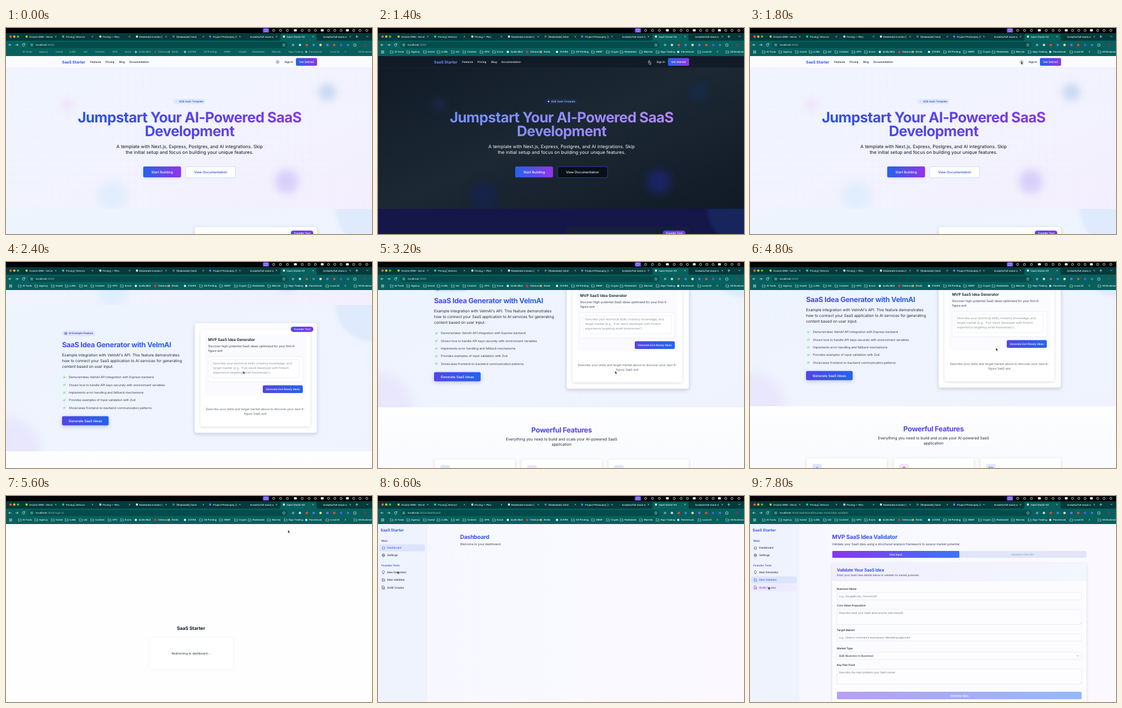
These frames come from a looping animation (640x360 px, 8 s). An HTML page:

```html
<!DOCTYPE html>
<html lang="en">
<head>
<meta charset="utf-8">
<title>SaaS Starter Kit</title>
<style>
html, body { margin: 0; width: 100%; height: 100%; overflow: hidden; background: #000; }
svg { display: block; width: 100%; height: 100%; font-family: Inter, Roboto, sans-serif; text-rendering: geometricPrecision; }
.tight { letter-spacing: -.025em; }
.soft { filter: blur(7px); }
.hazy { filter: blur(2.5px); }
.card { filter: drop-shadow(0 1px 2px #33415533); }
.lift { filter: drop-shadow(0 2px 3px #33415540); }
</style>
</head>
<body>
<svg id="stage" viewBox="0 0 640 360"></svg>
<script>
const LOOP = 8000;
const mid = 'text-anchor="middle" ', medium = 'font-weight="500" ', semi = 'font-weight="600" ', bold = 'font-weight="700" ';
const heading = bold + 'class="tight" ';
const ink = '#111827', slate = '#374151', muted = '#8b93a1';

// y is the middle of the capitals
const text = (x, y, size, str, fill = ink, opt = '') =>
  `<text x="${x}" y="${(y + size * .36).toFixed(2)}" font-size="${size}" fill="${fill}" ${opt}>${str}</text>`;
const lines = (x, y, gap, size, rows, fill, opt) => rows.map((row, i) => text(x, y + i * gap, size, row, fill, opt)).join('');
const rect = (x, y, w, h, r, fill, opt = '') =>
  `<rect x="${x}" y="${y}" width="${w}" height="${h}" rx="${r}" fill="${fill}" ${opt}/>`;
const dot = (x, y, r, fill, opt = '') => `<circle cx="${x}" cy="${y}" r="${r}" fill="${fill}" ${opt}/>`;
const line = (d, color, width = .7, opt = '') =>
  `<path d="${d}" fill="none" stroke="${color}" stroke-width="${width}" stroke-linecap="round" stroke-linejoin="round" ${opt}/>`;
const group = (id, body, y = 0) => `<g ${id ? `id="${id}"` : ''} ${y ? `transform="translate(0 ${y})"` : ''}>${body}</g>`;
const button = (x, y, w, h, label, size, fill, color = '#fff', opt = '') =>
  rect(x, y, w, h, 2.3, fill, opt) + text(x + w / 2, y + h / 2, size, label, color, mid + medium);
const gradient = (id, from, to, opt = '', via = '') =>
  `<linearGradient id="${id}" ${opt}><stop stop-color="${from}"/>${via && `<stop offset=".5" stop-color="${via}"/>`}` +
  `<stop offset="1" stop-color="${to}"/></linearGradient>`;

// Stepped timeline: [[time, declarations], ...]
let css = '', trackCount = 0;
function track(selector, steps) {
  const name = 'track' + trackCount++;
  css += `@keyframes ${name}{${steps.map(([t, rule]) => `${t / LOOP * 100}%{${rule}}`).join('')}}` +
    `${selector}{animation:${name} ${LOOP}ms step-end infinite}`;
}
const show = (selector, from, to = LOOP) => track(selector,
  [[0, 'visibility:hidden'], [from, 'visibility:visible'], ...(to < LOOP ? [[to, 'visibility:hidden']] : [])]);
const move = (selector, steps) => track(selector, steps.map(([t, x, y]) => [t, `transform:translate(${x}px,${y}px)`]));

const defs = `<defs>
  ${gradient('brand', '#2563eb', '#9333ea')}${gradient('indigo', '#4f46e5', '#2563eb')}
  ${gradient('violet', '#4f46e5', '#7c3aed')}${gradient('tab', '#8b35ea', '#3b76f2')}
  ${gradient('faded', '#b6a0ee', '#96b9fa')}${gradient('panel', '#f1eefe', '#f3f7ff')}
  ${gradient('title', 'var(--from)', 'var(--to)', 'gradientUnits="userSpaceOnUse" x1="98" x2="544"')}
  ${gradient('sky', 'var(--sky1)', 'var(--sky3)', 'x2="1" y2="1"', 'var(--sky2)')}
  ${gradient('band', 'var(--band)', 'var(--band2)', 'y2="1"')}
  ${gradient('mist', '#fefeff', '#eff4fb', 'x2="0" y2="1"')}
  ${gradient('board', '#f6f8ff', '#fbf9ff')}
  <clipPath id="section"><rect y="75" width="640" height="256"/></clipPath>
  <pattern id="grid" width="13.3" height="13.3" patternUnits="userSpaceOnUse" y="4">
    <path d="M0 0H13.3M0 0V13.3" stroke="#6366f1" stroke-width=".5" opacity=".08"/></pattern></defs>`;

function browser() {
  const tabs = [[36, 41, 'Drizzle ORM - Get st', '#b8d94b', 87], [100, 105, 'Pricing | Kelvorn', '#34c98e', 151],
    [165, 169, 'Pricing — Plim', '#d8eee8', 216], [229, 233, 'Realestate Investor |', '#e8eeee', 280],
    [293, 298, '[Realestate] Solid', '#547c80', 345], [357, 362, 'Project Philosophy | I', '#7b6cf0', 409],
    [0, 427, 'korbaltz/full-stack-s', '', 473], [486, 491, 'SaaS Starter Kit', '#dbe9ea', 537],
    [0, 555, 'korbaltz/full-stack-s', '', 602]];
  const cross = x => line(`M${x - 1} 14l2 2m0-2l-2 2`, '#d7e7e5', .5);
  const menu = [468, 480, 492, 506, 518, 530, 541, 553, 564, 575, 586, 597, 608, 619, 631];
  const marks = [[24, 'AI Tools'], [53, 'Agency'], [82, 'Invest'], [106, 'LLMs'], [131, 'IaC'], [151, 'Content'],
    [181, 'OPS'], [203, 'Ecom'], [227, 'Quillo Mail', '#e9efee'], [261, 'Vidmuro', '#f33'], [285, 'Brellu', '#d6a75c'],
    [313, 'ZUVRA', '#e9efee'], [341, '3D Printing'], [376, 'SMSF'], [402, 'Crypto'], [426, 'Realestate'],
    [460, 'Murmlo'], [489, 'Algo Trading'], [525, 'Parcelnook', '#d9e8f5'], [562, 'Local AI'], [611, 'All Bookmarks']];
  const folder = x => line(`M${x - 2.2} 39.8h1.6l.7.7h2.3v3.3h-4.6z`, '#d6e8e5', .6, 'class="folder"');
  const tools = ['#55a7a8', '#bfd8df', '#e34b45', '#3a86d4', '#e7d9b4', '#7e6be0', '#e24a3b', '#3c63e6', '#4a78b8'];
  const url = (id, path) => text(52, 29.7, 4.6, `localhost<tspan fill="#a4c3c1">:3000${path}</tspan>`, '#fff', `id="${id}"`);
  return rect(0, 0, 640, 9.5, 0, '#020304') + rect(449, .5, 11, 7.5, 1.5, '#6c4ce0') +
    rect(452, 2.4, 5, 3.3, .5, 'none', 'stroke="#fff" stroke-width=".6"') +
    menu.map((x, i) => i % 4 == 3 ? rect(x - 2.5, 2, 5, 4, .8, '#e8e8e8')
      : dot(x, 4.2, 1.9, 'none', 'stroke="#e5e5e5" stroke-width=".8"')).join('') +
    rect(0, 9, 640, 14, 0, '#033a3c') + rect(0, 22, 640, 27, 0, '#07605d') +
    `<path d="M477 22q3 0 3-3v-6q0-2.5 2.5-2.5h58q2.5 0 2.5 2.5v6q0 3 3 3z" fill="#07605d"/>` +
    ['#ff5f57', '#febc2e', '#28c840'].map((c, i) => dot(8 + i * 6.5, 15, 2.1, c)).join('') +
    tabs.map(([icon, x, name, color, close]) => (icon ? dot(icon, 15, 1.9, color) : '') +
      text(x, 15, 4.2, name, '#eef6f5', medium) + cross(close)).join('') +
    line('M611.5 15h4m-2-2v4M630.5 14l1.5 1.5 1.5-1.5', '#e4f0ee') +
    line('M9 29.5H5m1.7-1.8L5 29.5l1.7 1.8M17 29.5h4m-1.7-1.8l1.7 1.8-1.7 1.8', '#e4f0ee') +
    line('M32.7 28.3a2.2 2.2 0 1 0 .3 2M33 27v1.7h-1.7', '#e4f0ee') +
    rect(39, 24.3, 453, 10.7, 5.3, '#044c4c') + dot(45, 29.6, 3.6, '#0c6662') +
    line('M43.5 28.6h3m-3 2h3', '#e4f0ee', .6) +
    url('url-home', '') + url('url-sign', '/sign-in') + url('url-dash', '/dashboard') +
    url('url-gen', '/dashboard/founder-tools/idea-generator') + url('url-val', '/dashboard/founder-tools/idea-validator') +
    line('M486 27.2l.8 1.6 1.8.2-1.3 1.2.3 1.8-1.6-.9-1.6.9.3-1.8-1.3-1.2 1.8-.2z', '#d9e9e7', .5) +
    tools.map((c, i) => dot(502 + i * 12, 29.6, 2.2, c)).join('') +
    rect(608, 27.8, 4, 4, .8, 'none', 'stroke="#e4f0ee" stroke-width=".7"') + dot(628, 29.6, 3, '#3b4f55') +
    [0, 1, 2].map(i => [0, 1, 2].map(j => rect(5.7 + i * 1.8, 39.5 + j * 1.8, 1.2, 1.2, 0, '#e4f0ee', 'class="folder"')).join('')).join('') +
    group('marks', marks.map(([x, name, color]) => (color ? dot(x, 41.8, 2, color) : folder(x)) +
      text(x + 5, 41.8, 4.2, name, '#f3f9f8', medium)).join('') + text(592, 41.5, 5, '»', '#e4f0ee'));
}

function hero() {
  const blob = (x, y, r, name) => dot(x, y, r, `var(--${name})`, 'class="soft"');
  const nav = [[147, 'Features'], [174, 'Pricing'], [198, 'Blog'], [216, 'Documentation'], [487, 'Sign In']];
  return rect(0, 49, 640, 267.5, 0, 'url(#sky)') + rect(0, 70, 640, 246, 0, 'url(#grid)', 'style="opacity:var(--grid)"') +
    blob(562, 112, 15, 'blob1') + blob(107, 134, 11, 'blob2') + blob(491, 268, 21, 'blob3') + blob(186, 294, 25, 'blob4') +
    rect(0, 48, 640, 21.5, 0, 'var(--nav)') + rect(0, 69.5, 640, .5, 0, 'var(--rule)') +
    text(98, 59.3, 6.7, 'SaaS Starter', 'url(#title)', bold) +
    nav.map(([x, name]) => text(x, 59.2, 4.65, name, 'var(--ink)', medium)).join('') +
    group('sun', dot(475, 59.3, 1.3, 'none', 'stroke="#374151" stroke-width=".6"') +
      [...Array(8)].map((_, i) => line('M475 56.9v-.7', '#374151', .6, `transform="rotate(${i * 45} 475 59.3)"`)).join('')) +
    group('moon', line('M474.8 56.8a2.5 2.5 0 1 0 2.7 2.9a2 2 0 0 1-2.7-2.9z', '#e5e7eb', .6)) +
    button(507, 52.5, 37, 13.5, 'Get Started', 4.65, 'url(#brand)') +
    rect(292, 123.5, 57, 9.5, 4.7, 'var(--badge)') +
    '<path d="M298.3 126.2l.6 1.5 1.500.6-1.500.6-.6 1.500-.6-1.500-1.500-.6 1.500-.6z" fill="var(--spark)"/>' +
    text(303, 128.3, 4.55, 'B2B SaaS Template', 'var(--badgeink)', medium) +
    lines(321, 156.3, 24, 25.2, ['Jumpstart Your AI-Powered SaaS', 'Development'], 'url(#title)', mid + heading) +
    lines(321, 207.4, 10.2, 8, ['A template with Next.js, Express, Postgres, and AI integrations. Skip',
      'the initial setup and focus on building your unique features.'], 'var(--ink)', mid) +
    button(240, 242, 66, 19, 'Start Building', 5.85, 'url(#brand)', '#fff', 'class="card"') +
    button(314, 242.3, 87.3, 19.4, 'View Documentation', 5.85, 'var(--ghost)', 'var(--ghostink)', 'stroke="var(--ghostline)" stroke-width=".8"');
}

const ideaForm = () =>
  rect(340, 118, 192.5, 169.5, 3.5, '#fff', 'class="card"') + rect(348, 126, 176, 107, 3, '#fafaff') +
  text(353.5, 136, 6.6, 'MVP SaaS Idea Generator', ink, semi) +
  lines(353.5, 147.3, 8.2, 5.3, ['Discover high-potential SaaS ideas optimized for your first 6-', 'figure exit'], slate) +
  rect(353.5, 165.5, 165.5, 44, 2.5, '#fff', 'stroke="#e6e9f3" stroke-width=".6"') +
  rect(358.5, 170.5, 155, 32, 2, '#fff', 'stroke="#e3e6f0" stroke-width=".6"') +
  lines(362, 177.3, 8.1, 5.3, ['Describe your technical skills, industry knowledge, and',
    "target market (e.g., 'Full-stack developer with fintech", "experience targeting small businesses')..."], muted) +
  button(449, 215.5, 70, 13.5, 'Generate Exit-Ready Ideas', 4.7, 'url(#indigo)') +
  lines(436, 257, 8.2, 5.3, ['Describe your skills and target market above to discover your next 6-', 'figure SaaS exit'], '#5b6472', mid);

function ideaSection() {
  const points = ['Demonstrates VelmAI API integration with Express backend', 'Shows how to handle API keys securely with environment variables',
    'Implements error handling and fallback mechanisms', 'Provides examples of input validation with Zod',
    'Showcases frontend-to-backend communication patterns'];
  return rect(0, 75, 640, 256, 0, 'url(#band)') +
    `<g clip-path="url(#section)">${dot(640, 75, 64, 'var(--glow)', 'class="hazy"')}${dot(0, 331, 60, 'var(--glow2)', 'class="soft"')}</g>` +
    rect(98, 120, 58, 9.5, 4.7, '#dfe6fd') + rect(102, 122.7, 5, 4, 1, '#6b83c9') + dot(103.5, 124.5, .6, '#fff') + dot(105.5, 124.5, .6, '#fff') +
    text(109.5, 124.8, 4.65, 'AI Example Feature', '#3730a3', medium) +
    text(98, 144.3, 12.5, 'SaaS Idea Generator with VelmAI', 'url(#indigo)', heading) +
    lines(98, 163, 9.6, 6.67, ["Example integration with VelmAI's API. This feature demonstrates",
      'how to connect your SaaS application to AI services for generating', 'content based on user input.'], '#1f2937') +
    points.map((p, i) => dot(102, 201.5 + i * 13.3, 3.2, '#d9f6e4') +
      line(`M100.6 ${201.6 + i * 13.3}l1 1 1.9-2.1`, '#16a34a') + text(110, 201.5 + i * 13.3, 5.3, p, slate)).join('') +
    button(98, 269.5, 81.5, 16, 'Generate SaaS Ideas', 5.88, 'url(#indigo)', '#fff', 'class="lift"') +
    rect(330, 107, 213.5, 191.5, 4, 'var(--card)', 'class="lift"') +
    group('form', ideaForm()) +
    rect(498, 113, 39.5, 9.2, 4.6, 'url(#violet)') + text(517.7, 117.6, 4.55, 'Founder Tool', '#fff', mid + medium);
}

function features() {
  const cards = [
    ['Authentication', '#dbe5fe', '#2563eb', 'M-2 0h4v3h-4zM-1.2 0v-1.3a1.2 1.2 0 0 1 2.4 0V0', ['Secure authentication with Vorin, including', 'organization support and team management.']],
    ['Content Management', '#eee3fd', '#9333ea', 'M-2.5-1h5v3.5h-5zM-1.5-1v-1.5h3V-1M-1 1h2', ['Headless CMS with Directus for marketing', 'pages and blog content with real-time updates.']],
    ['Type-Safe API', '#dfe6fd', '#4f46e5', 'M-3-2.5h6v5h-6zM-1.7-1l1 1-1 1M.3 1h1.2', ['End-to-end type safety with tRPC, Zod, and', 'OpenAPI generation for reliable integrations.']],
    ['Database', '#dcf3ec', '#0f766e', 'M-2.3-2a2.3 1 0 0 1 4.6 0a2.3 1 0 0 1-4.6 0v4a2.3 1 0 0 0 4.6 0v-4M-2.3 0a2.3 1 0 0 0 4.6 0', ['Serverless Postgres with Plim and Drizzle', 'ORM for type-safe database access and', 'scaling.']],
    ['Async Workflows', '#ebe4f8', '#dc2650', 'M0-2.7l1 1-1 1-1-1zM0 .7l1 1-1 1-1-1zM-1.7-1l1 1-1 1-1-1zM1.7-1l1 1-1 1-1-1z', ['Long-running tasks with Kelvorn Workflows', 'and QDrovel for reliable AI job processing.']],
    ['Analytics', '#def4e7', '#ea6a12', 'M-3 0h1.8v2.7H-3zM-1-1.3H.8v4H-1zM1-2.7h1.8v5.4H1z', ['Track user behavior and product usage with', 'Tarvolg analytics for data-driven decisions.']]];
  return rect(0, -43, 640, 292, 0, 'url(#mist)') +
    text(321, -4, 12.5, 'Powerful Features', 'url(#title)', mid + heading) +
    lines(321, 12.3, 9.6, 6.67, ['Everything you need to build and scale your AI-powered SaaS', 'application'], '#1f2937', mid) +
    cards.map(([name, tint, color, icon, rows], i) => {
      const x = 99 + i % 3 * 152, y = i < 3 ? 48 : 134;
      return rect(x, y, 140.5, i < 3 ? 74 : 82, 3, '#fff', 'class="card"') + rect(x + 10, y + 10, 16.5, 16, 2.5, tint) +
        line(icon, color, .7, `transform="translate(${x + 18.2} ${y + 18})"`) + text(x + 10, y + 38.5, 6.7, name, ink, semi) +
        lines(x + 10, y + 51.7, 8, 5.3, rows, '#4b5563');
    }).join('') +
    rect(0, 249, 640, 160, 0, 'url(#brand)') +
    text(321, 282, 12.5, 'Ready to Transform Your Business Ideas?', '#fff', mid + heading) +
    lines(321, 301.2, 9.6, 6.67, ['Start building your AI-powered SaaS application today with our comprehensive',
      'starter kit. No credit card required.'], '#e6e8ff', mid) +
    button(255, 328, 68, 17, 'Get Started Free', 5.88, '#fff', '#2f5be9') + rect(328.5, 328, 58.5, 17.5, 2.3, '#fff') +
    text(320, 357, 4.65, 'Join thousands of entrepreneurs already using our platform', '#dcdcff', mid);
}

const signIn = () => rect(0, 48, 640, 312, 0, '#fefefe') + text(323.5, 231, 8.1, 'SaaS Starter', ink, mid + bold) +
  rect(250, 247, 147.5, 55.5, 3, '#fff', 'style="filter:drop-shadow(0 .5px .8px #33415522)"') +
  text(323.3, 275.2, 5.3, 'Redirecting to dashboard...', '#27303f', mid);

function board(id, active, title, subtitle, body) {
  const items = [[90.5, 'Dashboard', 'M-2.5 0l2.5-2.5 2.5 2.5M-1.8-.5v3h3.6v-3'],
    [103.7, 'Settings', 'M-1.2 0a1.2 1.2 0 1 0 2.4 0a1.2 1.2 0 1 0-2.4 0M0-2.5l2.2 1.2v2.6L0 2.5l-2.2-1.2v-2.6z'],
    [133.3, 'Idea Generator', 'M-.8 1.2a2 2 0 1 1 1.6 0v1.3h-1.6z'],
    [146.6, 'Idea Validator', 'M2.3 0v2.3h-4.6v-4.6h3M-1-.3L0 .8l2.5-2.8'],
    [160, 'SUW Creator', 'M-2-2.7h2.5l1.5 1.5v4h-4zM-.8 0H.8M-.8 1.3H.8']];
  const item = ([y, name, icon], color, back) => (back ? rect(2, y - 6, 80, 12.2, 2, back) : '') +
    line(icon, color, .6, `transform="translate(9.5 ${y})"`) + text(16, y, 4.75, name, color, medium);
  return group(id, rect(0, 48, 640, 312, 0, 'url(#board)') + rect(0, 48, 85, 312, 0, '#eff3fe') + rect(85, 48, .5, 312, 0, '#dfe5f5') +
    text(4.5, 59.3, 6.7, 'SaaS Starter', 'url(#indigo)', bold) +
    text(6, 78.5, 4.65, 'Main', '#3f4fe0', semi) + text(6, 121.5, 4.65, 'Founder Tools', '#3f4fe0', semi) +
    items.map((it, i) => i == active ? item(it, '#3f5be8', '#dde5fd') : item(it, '#273142')).join('') +
    (active == 3 ? group('hover', item(items[4], '#6d3be0', '#edebff')) : '') +
    text(143.5, 71, 10, title, 'url(#indigo)', heading) + text(143.5, 83.7, 5.3, subtitle, slate) + body);
}

function validator() {
  const fields = [[162.3, 'Business Name', 169, 12.5, 'e.g., GaugeBrook, ChoreChief'],
    [191.3, 'Core Value Proposition', 198, 26.5, 'Describe what your SaaS does and its main benefit'],
    [234.3, 'Target Market', 241, 12.5, 'e.g., Small e-commerce businesses, Marketing agencies'],
    [266.3, 'Market Type', 273, 12.5, 'B2B (Business to Business)'],
    [295.8, 'Key Pain Point', 302.3, 26.5, 'Describe the main problem your SaaS solves']];
  return rect(144, 96, 444.5, 12, 1.5, '#e0e6f5') + rect(144, 96, 222, 12, 1.5, 'url(#tab)') +
    text(255, 102, 4.65, 'Idea Input', '#fff', mid + medium) + text(476.5, 102, 4.65, 'Validation Results', '#9aa6be', mid + medium) +
    rect(143.5, 118, 445, 260, 3, '#fcfcff', 'class="card"') + rect(143.5, 118, 445, 31, 3, 'url(#panel)') +
    text(152, 129, 7.5, 'Validate Your SaaS Idea', 'url(#indigo)', heading) +
    text(152, 138.7, 4.65, 'Enter your SaaS idea details below to validate its market potential.', slate) +
    fields.map(([ly, label, y, h, hint], i) => text(152, ly, 4.65, label, ink, medium) +
      rect(152, y, 428, h, 1.8, '#fdfdff', 'stroke="#dce1ec" stroke-width=".6"') +
      text(156, y + 6.3, 4.65, hint, i == 3 ? ink : '#6b7280') +
      (i == 3 ? line(`M571.8 ${y + 5.7}l1.4 1.4 1.4-1.4`, '#6b7280', .6) : '') +
      (h > 20 ? line(`M577 ${y + h - 1}l2-2`, '#9ca3af', .4) : '')).join('') +
    button(152, 342, 428, 13.3, 'Validate Idea', 5.2, 'url(#faded)');
}

const generator = `<g transform="translate(-69 -12)">${rect(212.5, 107, 445, 191, 4, '#fcfcff', 'class="card"')}${ideaForm()}</g>`;

document.getElementById('stage').innerHTML = defs +
  group('home', group('scroll', hero() + group('', ideaSection(), 241) + group('', features(), 615))) +
  group('sign', signIn()) +
  board('dash', 0, 'Dashboard', 'Welcome to your dashboard.', '') +
  board('gen', 2, 'MVP SaaS Idea Generator', 'Discover high-potential SaaS ideas optimized for your first 6-figure exit', generator) +
  board('val', 3, 'MVP SaaS Idea Validator', 'Validate your SaaS idea using a structured analysis framework to assess market potential.', validator()) +
  browser() +
  group('pointer', group('arrow', '<path d="M0 0v5.3l1.3-1.2.9 2 .9-.4-.9-1.9h1.7z" fill="#111" stroke="#fff" stroke-width=".4"/>'));

const vars = list => Object.entries(list).map(([k, v]) => `--${k}:${v}`).join(';');
const light = vars({ from: '#2356e6', to: '#8a35ea', sky1: '#f0f5ff', sky2: '#f2f3fe', sky3: '#f4effe', band: '#edf4fe', band2: '#f0f3fe', grid: 1,
  blob1: '#c9d9f1', blob2: '#efe2fb', blob3: '#d9d0fa', blob4: '#e0edfd', nav: '#fafbff', rule: '#e4e9f5', ink, badge: '#e1e9fd',
  badgeink: '#2546b8', spark: '#cfd6e6', ghost: '#fff', ghostink: '#2450d8', ghostline: '#bfd4fb', card: '#fff', glow: '#dfebfd', glow2: '#e9e7fd' });
const dark = vars({ from: '#6b90f9', to: '#b785fb', sky1: '#0f1a26', sky2: '#1c2833', sky3: '#101a27', band: '#141747', band2: '#141747', grid: .15,
  blob1: '#152b48', blob2: '#1d2748', blob3: '#1b2464', blob4: '#172347', nav: '#111c28', rule: '#1b2836', ink: '#f3f4f6', badge: '#1a2948',
  badgeink: '#a9c8fb', spark: '#dbe7fd', ghost: '#0a0e17', ghostink: '#dce8fd', ghostline: '#2a4dbb', card: '#151f3a', glow: '#18245c', glow2: '#141747' });

track('#stage', [[0, light], [1000, dark], [1800, light]]);
track('#moon', [[0, 'opacity:0'], [1000, 'opacity:1'], [1800, 'opacity:0']]);
track('#sun, #form', [[0, 'opacity:1'], [1000, 'opacity:0'], [1800, 'opacity:1']]);
track('#marks', [[0, 'opacity:.6'], [200, 'opacity:1']]);
show('.folder', 200);
move('#scroll', [[0, 0, 0], [2000, 0, -90], [2200, 0, -200], [2400, 0, -241], [3000, 0, -275], [3200, 0, -318], [3400, 0, -400],
  [3600, 0, -480], [3800, 0, -550], [4000, 0, -595], [4200, 0, -615], [4800, 0, -320], [5000, 0, 0]]);
show('#home, #url-home', 0, 5400);
show('#sign, #url-sign', 5400, 6000);
show('#dash, #url-dash', 6000, 6800);
show('#gen, #url-gen', 6800, 7400);
show('#val, #url-val', 7400);
track('#hover', [[0, 'opacity:0'], [7600, 'opacity:1']]);
show('#arrow', 600);
move('#pointer', [[0, 474, 58.5], [2000, 440, 140], [2200, 414.5, 190.5], [3800, 398, 215], [4000, 380.5, 237.5],
  [4800, 430, 150], [5000, 493, 59.5], [6200, 300, 90], [6400, 120, 115], [6600, 34, 131], [7200, 33, 145], [7600, 32, 158.5]]);
document.head.appendChild(Object.assign(document.createElement('style'), { textContent: css }));
</script>
</body>
</html>
```
